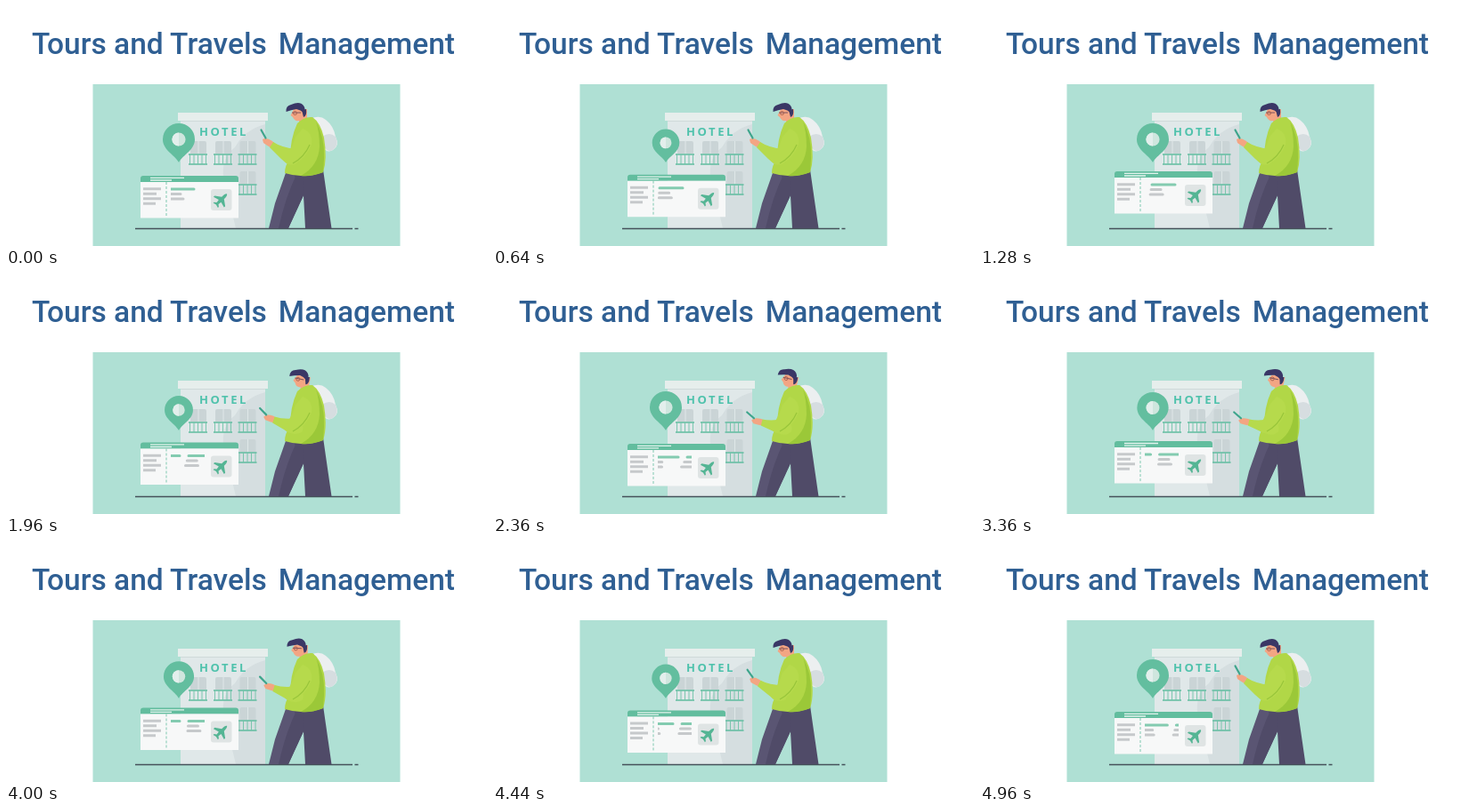
Animation of 540x270 px, one loop 5 s. Source, as an HTML page:

```html
<!DOCTYPE html>
<html lang="en">
<head>
<meta charset="utf-8">
<title>Tours and Travels Management</title>
<style>
  html, body { margin: 0; width: 100%; height: 100%; overflow: hidden; background: #fff; }
  svg { display: block; width: 100%; height: 100%; }
  .title { font: 500 33.5px Roboto, sans-serif; fill: #2f5f93; }
  .sign { font: 700 13px "Open Sans", sans-serif; letter-spacing: 2.6px; fill: #4fc2ac; }
</style>
</head>
<body>
<svg viewBox="0 0 540 270">
  <defs>
    <clipPath id="slot"><rect x="185" y="200" width="38" height="24"/></clipPath>
    <g id="window">
      <path d="M2 14V2Q2 0 4 0H18Q20 0 20 2V14Z" fill="#cad4d6"/>
      <path d="M11 0V14" stroke="#dfe7e8"/>
      <path d="M0 15H21M0 26H21" stroke="#5fbc9f" stroke-width="1.5"/>
      <path d="M1.5 15V26M6 15V26M10.5 15V26M15 15V26M19.5 15V26" stroke="#6fc2a8" stroke-width=".9"/>
    </g>
  </defs>

  <text class="title" x="29" y="54">Tours and Travels</text>
  <text class="title" x="305.8" y="54">Management</text>
  <rect x="97.5" y="88" width="345" height="182" fill="#afe0d4"/>

  <!-- hotel -->
  <rect x="196" y="128" width="95" height="122" fill="#e0e8e9"/>
  <path d="M291 133Q268 139 257 159Q242 170 244 192L258 250H291Z" fill="#d5dee0"/>
  <rect x="193" y="120" width="101" height="9" fill="#e6eeec"/>
  <path d="M196 129.5H291" stroke="#cfdad9"/>
  <text class="sign" x="217" y="145.5">HOTEL</text>
  <use href="#window" x="205" y="152"/>
  <use href="#window" x="233" y="152"/>
  <use href="#window" x="260.5" y="152"/>
  <use href="#window" x="260.5" y="186"/>
  <path d="M145 250.5H389M391.5 250.5H395.5" stroke="#45515a" stroke-width="1.6"/>

  <!-- map pin -->
  <g id="pin">
    <path d="M0 0C-5-9-18-14-18-26A18 18 0 0 1 18-26C18-14 5-9 0 0Z" fill="#63be9f"/>
    <circle cy="-26" r="7.6" fill="#cfe6de"/>
    <path d="M0-33.6A7.6 7.6 0 0 0 0-18.4Z" fill="#e3efec"/>
  </g>

  <!-- ticket -->
  <g id="ticket">
    <path d="M151 198V194Q151 191 154 191H258Q261 191 261 194V198Z" fill="#62bd9e"/>
    <path d="M162 193.4H200M162 196H186" stroke="#e3f3ee" stroke-width="1.3"/>
    <path d="M151 198H261V238.5H151Z" fill="#f7f8f8"/>
    <path d="M180 198V238" stroke="#7fc9b0" stroke-dasharray="3 2"/>
    <path d="M154 205.7H174M154 211.2H169M154 216.7H174M154 222.2H168" stroke="#c6c9cb" stroke-width="3"/>
    <g id="rows" clip-path="url(#slot)"></g>
    <rect x="230" y="206" width="23.5" height="24" rx="3" fill="#dfe4e4"/>
    <path transform="translate(241.5 218) rotate(45) scale(.93)" fill="#54b594"
      d="M0-10Q2-9 2-3L9 2V4L2 2L1.5 6L4 8V9.5L0 8.5L-4 9.5V8L-1.5 6L-2 2L-9 4V2L-2-3Q-2-9 0-10Z"/>
  </g>

  <!-- traveller -->
  <path d="M342 127Q352 122 359 128Q368 135 370 147Q375 157 367 162Q361 166 355 159Z" fill="#eceff0"/>
  <path d="M355 147Q363 141 370 147Q374 157 367 162Q362 165 358 160Z" fill="#d6dde0"/>
  <path d="M315 185L302 222L295 250H317L334 213L355 187Z" fill="#5a5573"/>
  <path d="M322 187L334 213L336 250H365.5Q360 212 356 184Z" fill="#504b68"/>
  <path d="M315 185H333L334 213L317 250H306Q314 214 326 190Z" fill="#504b68"/>
  <g id="head">
    <path d="M323 116L319.5 123L322 125Q324 130 329 129L330 136H338V116Z" fill="#f3a583"/>
    <path d="M332 117L334 125Q338 124 337 116Z" fill="#3c3766"/>
    <path d="M321 120H331" stroke="#7a5360" stroke-width="1"/>
    <circle cx="324.5" cy="120.5" r="2" fill="none" stroke="#a8604f" stroke-width=".9"/>
    <path d="M314.5 119Q314 112 320 111Q330 106.5 334 112Q337 116 334 120Q331 117 326 116Q320 117 314.5 119Z" fill="#3a3766"/>
  </g>
  <path d="M327 132Q335 124 344 125Q353 131 357 148Q361 172 356 187Q335 195 313 188Q313 179 319 172Q319 149 327 132Z" fill="#b1d747"/>
  <path d="M348 130Q358 147 357 172L356 187Q345 192 331 191Q351 180 352 158Q352 142 348 130Z" fill="#9bc838"/>
  <g id="arm">
    <path d="M288 150Q292 147 299 152L304 157L300 161Q293 157 289 154Z" fill="#f3a583"/>
    <path d="M286.5 139.5L291.5 148.5" stroke="#3ea58c" stroke-width="2.2" stroke-linecap="round"/>
    <path d="M300 153Q309 159 325 161Q331 170 326 177Q318 181 309 172L296 159Z" fill="#b6da4c"/>
  </g>
  <path d="M333 138Q345 142 343 156Q337 171 324 178Q316 180 312 174Q321 160 325 147Z" fill="#b6da4c"/>
  <path d="M341 156Q335 170 322 177" fill="none" stroke="#98c53a" stroke-width="1.2"/>
</svg>

<script>
const LOOP = 5000, WRAP = 36;
const byId = id => document.getElementById(id);
const mod = (a, n) => ((a % n) + n) % n;
const smooth = (a, b, t) => {
  const u = Math.min(1, Math.max(0, (t - a) / (b - a)));
  return u * u * (3 - 2 * u);
};

// Ticket text drifts right and re-enters from the left.
const drift = [[0, 0], [640, 2], [1280, 8], [1960, 20], [2880, 50], [4000, 56], [5000, 72]];
function driftAt(t) {
  const i = drift.findIndex(point => point[0] > t);
  const [t0, x0] = drift[i - 1], [t1, x1] = drift[i];
  return x0 + (x1 - x0) * (t - t0) / (t1 - t0);
}

const rows = [[206, 26, "#83cbb0"], [211.5, 11, "#c6c9cb"], [217, 14, "#c6c9cb"]].map(([y, width, color]) => {
  const path = document.createElementNS("http://www.w3.org/2000/svg", "path");
  path.setAttribute("d", `M185 ${y}h${width}M${185 - WRAP} ${y}h${width}`);
  path.setAttribute("stroke", color);
  path.setAttribute("stroke-width", 3);
  path.setAttribute("stroke-linecap", "round");
  byId("rows").append(path);
  return path;
});

const move = (id, value) => byId(id).setAttribute("transform", value);

function draw(now) {
  const t = now % LOOP;

  const beat = (t % 1250) / 1250;
  const size = 1 - .16 * (smooth(.12, .33, beat) - smooth(.47, .75, beat));
  move("pin", `translate(194 176) scale(${size})`);

  const lift = 5 * ((1 + Math.cos((t - 1310) / 2500 * 2 * Math.PI)) / 2) ** 1.6;
  move("ticket", `translate(0 ${-lift})`);
  rows.forEach((row, i) =>
    row.setAttribute("transform", `translate(${mod(driftAt(Math.max(0, t - 100 * i)), WRAP)} 0)`));

  const lookUp = smooth(1300, 2300, t) * (1 - smooth(3000, 4400, t));
  const lower = smooth(1300, 2300, t) * (1 - smooth(3600, 4900, t));
  move("head", `translate(${2 * lookUp} ${-lookUp}) rotate(${lookUp * 14} 334 130)`);
  move("arm", `translate(${7 * lower} ${2 * lower}) rotate(${-20 * lower} 322 170)`);

  requestAnimationFrame(tick);
}

let start;
function tick(now) {
  start ??= now;
  draw(now - start);
}
requestAnimationFrame(tick);
</script>
</body>
</html>
```
